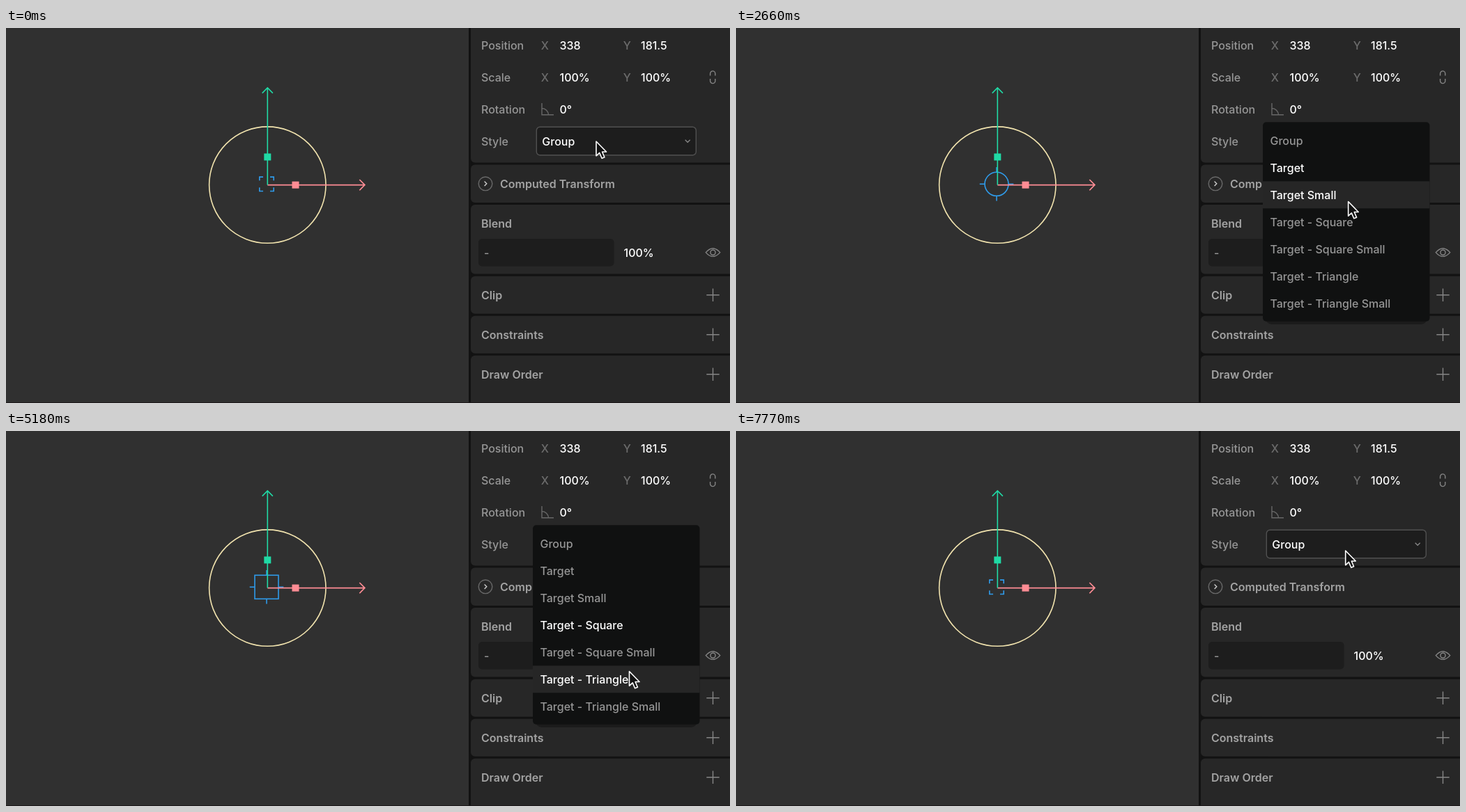
Write an HTML page that moves like this. It is 1039 by 539 pixels and loops after 7.84 s.

```html
<!DOCTYPE html>
<html lang="en">
<head>
<meta charset="utf-8">
<title>Group style picker</title>
<style>
  html, body { margin: 0; width: 100%; height: 100%; overflow: hidden; background: #303030; }
  svg { display: block; width: 1039px; height: 539px; }
  text { font: 500 16px Inter, sans-serif; fill: #969696; white-space: pre; }
  .head { font-weight: 600; fill: #a3a3a3; }
  .on { fill: #fff; }
  .axis { fill: #6c6c6c; }
  .line { fill: none; stroke: #858585; stroke-width: 1.4; }
  .dim { stroke: #686868; }
  .handle { fill: none; stroke: currentColor; stroke-width: 1.6; }
  .handle rect { fill: currentColor; stroke: none; }
  #marker { fill: none; stroke: #2f9bea; stroke-width: 1.6; }
</style>
</head>
<body>
<svg viewBox="0 0 1039 539">
  <rect width="1039" height="539" fill="#303030"/>
  <g id="marker" transform="translate(374 224.3)"></g>
  <g id="gizmo" transform="translate(375.3 225.6)">
    <circle r="83.7" fill="none" stroke="#f1e3ae" stroke-width="1.6"/>
  </g>
  <rect x="664" width="375" height="539" fill="#121212"/>
  <g id="panel"></g>
  <g id="field">
    <rect id="fieldBox" x="761.3" y="142.3" width="229" height="40.5" rx="5" fill="#1d1d1d" stroke="#505050" stroke-width="1.4"/>
    <text id="fieldText" class="on" x="769.3" y="168.6"></text>
    <path class="line" d="M974.7 160.7l3.5 3.5 3.5-3.5"/>
  </g>
  <g id="menu">
    <rect x="760" y="380" width="232" height="46" rx="9" fill="#1b1b1b"/>
    <rect x="756" y="135.3" width="239.5" height="286.5" rx="5" fill="#101111"/>
    <rect id="hover" x="756" width="239.5" height="39" fill="#262626"/>
  </g>
  <path id="cursor" d="M0 0V20.8L4.7 16.4 8.1 24.3 11.9 22.7 8.6 15H14.6Z" fill="#121212" stroke="#fff" stroke-width="1.6" stroke-linejoin="round"/>
  <rect y="538" width="1039" height="1" fill="#1d191a"/>
</svg>
<script>
const LOOP = 7840, STEP = 70, ROW = 39, MENU_TOP = 142.3;
const $ = id => document.getElementById(id);
const show = (id, visible) => { $(id).style.display = visible ? '' : 'none'; };

function add(parent, tag, attrs, content = '') {
  const el = document.createElementNS('http://www.w3.org/2000/svg', tag);
  for (const key in attrs) el.setAttribute(key, attrs[key]);
  el.textContent = content;
  return parent.appendChild(el);
}

// Move handles: one drawing, turned for each axis
for (const [color, angle] of [['#ff8c94', 0], ['#20d9a5', -90]]) {
  const handle = add($('gizmo'), 'g', { class: 'handle', color, transform: `rotate(${angle})` });
  add(handle, 'path', { d: 'M0 0H139.5M132-7.6l7.6 7.6-7.6 7.6' });
  add(handle, 'rect', { x: 35.2, y: -5, width: 10, height: 10 });
}

const panel = $('panel');
const label = (x, y, content, cls = '') => add(panel, 'text', { x, y: y + 5.7, class: cls }, content);
const icon = (d, cls = 'line') => add(panel, 'path', { d, class: cls });
const section = (top, bottom) =>
  add(panel, 'rect', { x: 667, y: top, width: 390, height: bottom - top, rx: 6, fill: '#272727' });

// Transform section
section(-20, 193.5);
['Position', 'Scale', 'Rotation', 'Style'].forEach((name, i) => label(682, 25 + 46 * i, name));
[['338', '181.5'], ['100%', '100%']].forEach((pair, i) => pair.forEach((value, j) => {
  label(767.7 + 118 * j, 25 + 46 * i, 'XY'[j], 'axis');
  label(794.5 + 116.5 * j, 25 + 46 * i, value, 'on');
}));
label(794.5, 117, '0°', 'on');
icon('M769 108V124.7H786M769 115.5A9.5 9.5 0 0 1 778.5 124.7', 'line dim');
icon('M1010.6 68.5V65.5a3.6 3.6 0 0 1 7.2 0V68.5M1010.6 73V76a3.6 3.6 0 0 0 7.2 0V73');

section(196.5, 251);
add(panel, 'circle', { cx: 688, cy: 223.8, r: 9.8, class: 'line dim' });
icon('M686.6 220.6l3.2 3.2-3.2 3.2').style.stroke = '#ccc';
label(709, 224, 'Computed Transform', 'head');

section(254, 353.5);
label(682, 281, 'Blend', 'head');
add(panel, 'rect', { x: 678, y: 303, width: 194.5, height: 39.5, rx: 5, fill: '#1d1d1d' });
label(686, 323, '-');
label(886.5, 323, '100%', 'on');
icon('M1004.3 322.6Q1014.5 311 1024.7 322.6 1014.5 334.2 1004.3 322.6Z');
add(panel, 'circle', { cx: 1014.5, cy: 322.6, r: 3.6, class: 'line' });

['Clip', 'Constraints', 'Draw Order'].forEach((name, i) => {
  const y = 384 + 57 * i;
  section(y - 27.2, i < 2 ? y + 26.7 : 560);
  label(682, y, name, 'head');
  icon(`M1005.3 ${y - .2}h18.4m-9.2-9.2v18.4`);
});

const styles = ['Group', 'Target', 'Target Small', 'Target - Square', 'Target - Square Small',
  'Target - Triangle', 'Target - Triangle Small'];
const items = styles.map((name, i) => add($('menu'), 'text', { x: 766.5, y: 167.7 + ROW * i }, name));

// Canvas marker for each style that gets picked
const fourfold = d => [0, 90, 180, 270].map(a => `<path d="${d}" transform="rotate(${a})"/>`).join('');
const ticks = fourfold('M0-17V-24.3');
const shapes = {
  'Group': fourfold('M-10.2-5V-10.2H-5'),
  'Target': ticks + '<circle r="17"/>',
  'Target - Square': ticks + '<rect x="-17" y="-17" width="34" height="34"/>',
  'Target - Triangle': '<path d="M.5-16.8L17 9.8H-16ZM.5-24.3V-17M.5 9.8V20"/>'
};

// The menu opens, then closes on the picked style
const sessions = [
  { open: 420, close: 1400, pick: 'Target' },
  { open: 2170, close: 3150, pick: 'Target - Square' },
  { open: 4270, close: 5390, pick: 'Target - Triangle' },
  { open: 6160, close: 7210, pick: 'Group' }
];
// Pointer moves: start, end, x, y
const home = [847, 163];
const moves = [
  [770, 980, 842.5, 205],
  [1400, 1960, 872, 168],
  [2240, 2870, 881, 278],
  [3290, 4150, 882, 165],
  [4270, 5180, 894.5, 345.5],
  [5390, 6160, 880, 153],
  [7210, 7770, 874.7, 172]
];

function pointerAt(t) {
  return moves.reduce(([x, y], [start, end, toX, toY]) => {
    const u = Math.max(0, Math.min(1, (t - start) / (end - start)));
    const k = u * u * (3 - 2 * u);
    return [x + (toX - x) * k, y + (toY - y) * k];
  }, home);
}

function render(t) {
  const [x, y] = pointerAt(t);
  const last = sessions.filter(s => s.close <= t).pop();
  const selected = last ? last.pick : 'Group';
  const session = sessions.find(s => t >= s.open && t < s.close);

  $('cursor').setAttribute('transform', `translate(${x} ${y})`);
  $('marker').innerHTML = shapes[selected];
  $('fieldText').textContent = selected;
  show('fieldBox', x > 761 && x < 991 && y > 142 && y < 183);
  show('field', !session);
  show('menu', session);
  if (!session) return;

  // The selected row is lit until the pointer moves inside the menu
  const [, openY] = pointerAt(session.open);
  const active = y === openY ? styles.indexOf(selected) : Math.floor((y - MENU_TOP) / ROW);
  $('hover').setAttribute('y', MENU_TOP + ROW * active);
  items.forEach((item, i) =>
    item.setAttribute('class', i === active || styles[i] === selected ? 'on' : ''));
}

const began = performance.now();
function tick() {
  const t = (performance.now() - began) % LOOP;
  render(Math.floor(t / STEP) * STEP);
  requestAnimationFrame(tick);
}
tick();
</script>
</body>
</html>
```
